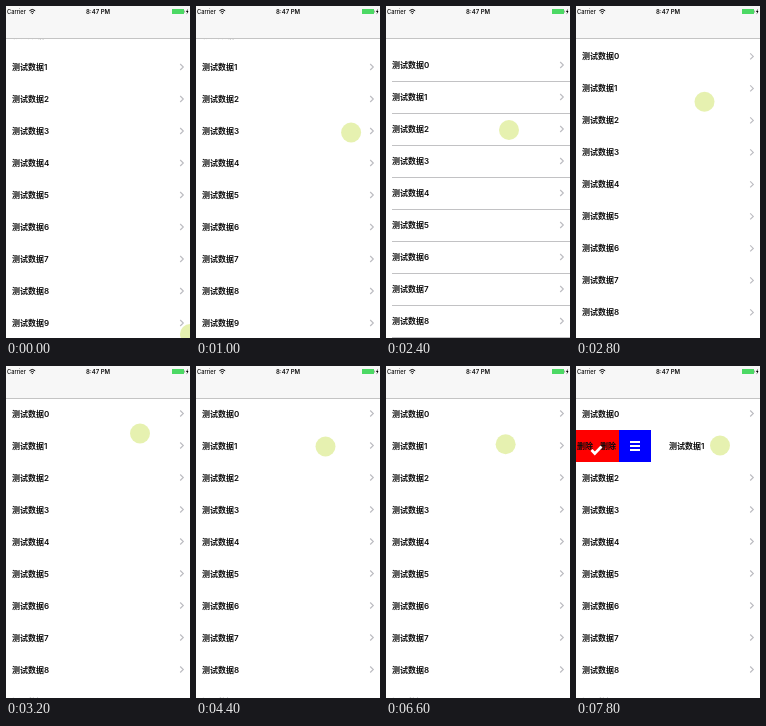
An HTML page for the animation above (8 s loop, 184 px wide and 332 px high).

```html
<!DOCTYPE html>
<html lang="zh">
<head>
<meta charset="utf-8">
<style>
html, body { margin: 0; width: 100%; height: 100%; overflow: hidden; background: #fff; }
svg { display: block; width: 184px; height: 332px; }
rect, .line { shape-rendering: crispEdges; }
text { font: 600 8px Inter, "Noto Sans CJK SC", "Noto Sans CJK", sans-serif; fill: #0c0c0c; }
.status { font-size: 5.7px; font-weight: 500; }
.clock { font-size: 6px; font-weight: 600; text-anchor: middle; }
.chevron { fill: none; stroke: #bcbcc1; stroke-width: 1.15; }
.line { stroke: #c2c2c4; stroke-width: 1; visibility: hidden; }
.pulled .line, .swiped .line { visibility: visible; }
#actions { visibility: hidden; }
.swiped #actions { visibility: visible; }
</style>
</head>
<body>
<svg viewBox="0 0 184 332">
  <g id="list"></g>

  <g id="bar">
    <rect width="184" height="32" fill="#f7f7f7"/>
    <path d="M0 32.5H184" stroke="#c4c4c4"/>
    <text class="status" x="1" y="7.7">Carrier</text>
    <g fill="none" stroke="#000">
      <path d="M23.4 4.7Q26.3 2.1 29.2 4.7M24.6 6.2Q26.3 4.7 28 6.2"/>
      <path d="M25.4 7.1L26.3 8.2L27.2 7.1Z" fill="#000" stroke="none"/>
    </g>
    <text class="clock" x="92" y="7.8">8:47 PM</text>
    <rect x="166" y="3" width="12" height="5" rx="1" fill="#4cd964"/>
    <path d="M178.6 4.6V6.6" stroke="#777" stroke-width=".7"/>
    <path d="M181.8 2.7L180 6H181.1L180.6 8.5L182.5 5.1H181.4Z"/>
  </g>

  <circle id="touch" r="10" fill="rgba(200,224,80,.45)"/>
</svg>
<script>
const PITCH = 32, STEP = 200, LOOP = 8000;
const START = 29, REST = 47.5;           // list offset before and after the pull
const GRAB_Y = 71, RELEASE = 2400, SETTLE = 800;
const SWIPE_AT = 7400, SWIPE_X = 57;

const list = document.getElementById('list');
const touch = document.getElementById('touch');

const actions = `
  <g id="actions">
    <rect y="-15.5" width="43" height="32" fill="#f00"/>
    <rect x="43" y="-15.5" width="32" height="32" fill="#00f"/>
    <text x="1" y="3">删除</text><text x="24" y="3">删除</text>
    <path d="M15.5 4.5L18.8 8L25.5 1" fill="none" stroke="#fff" stroke-width="2.6"/>
    <path d="M54 -3.5H64M54 .5H64M54 4.5H64" stroke="#fff" stroke-width="1.8"/>
  </g>`;

const row = (i, swipable = i === 1) => `
  <g transform="translate(0 ${i * PITCH})">
    ${swipable ? actions : ''}
    <g ${swipable ? 'id="cell"' : ''}>
      <rect y="-15.5" width="184" height="32" fill="#fff"/>
      <text x="6" y="3">测试数据${i}</text>
      <path class="chevron" d="M174.2 -3L177.3 0L174.2 3"/>
      <path class="line" d="M6 16.5H184"/>
    </g>
  </g>`;

list.innerHTML = Array.from({ length: 11 }, (_, i) => row(i)).join('');
const cell = document.getElementById('cell');

// Turning points of the finger: time, x, y
const turns = [
  [200, 184, 328], [1400, 145, 56], [2230, 123, 124], [RELEASE, 123, 124],
  [3200, 134, 67.5], [3800, 138, 77], [4400, 129.5, 80.5], [5200, 37, 78],
  [6100, 176, 75], [7250, 36, 83], [7800, 144, 79.5]
];

const clamp = p => Math.min(1, Math.max(0, p));
const ease = p => p * p * (3 - 2 * p);

function finger(t) {
  const n = Math.max(1, turns.findIndex(k => k[0] >= t));
  const [t0, x0, y0] = turns[n - 1], [t1, x1, y1] = turns[n];
  const p = ease(clamp((t - t0) / (t1 - t0)));
  return [x0 + (x1 - x0) * p, y0 + (y1 - y0) * p];
}

// The list follows the finger, resists past its top, then springs back
function scrollAt(t) {
  if (t < 1400) return START;
  const over = START + Math.max(0, finger(Math.min(t, RELEASE))[1] - GRAB_Y) - REST;
  const left = 1 - clamp((t - RELEASE) / SETTLE);
  return REST + (over > 0 ? over / 3 * left * left : over);
}

function draw() {
  const t = Math.floor(performance.now() % LOOP / STEP) * STEP;
  const [x, y] = finger(t);
  const scroll = scrollAt(t);
  const swipe = t > SWIPE_AT ? Math.max(0, x - SWIPE_X) : 0;
  touch.setAttribute('transform', `translate(${x} ${y})`);
  list.setAttribute('transform', `translate(0 ${scroll})`);
  cell.setAttribute('transform', `translate(${swipe} 0)`);
  list.classList.toggle('pulled', scroll >= 53);
  cell.parentNode.classList.toggle('swiped', swipe > 0);
  requestAnimationFrame(draw);
}
draw();
</script>
</body>
</html>
```
